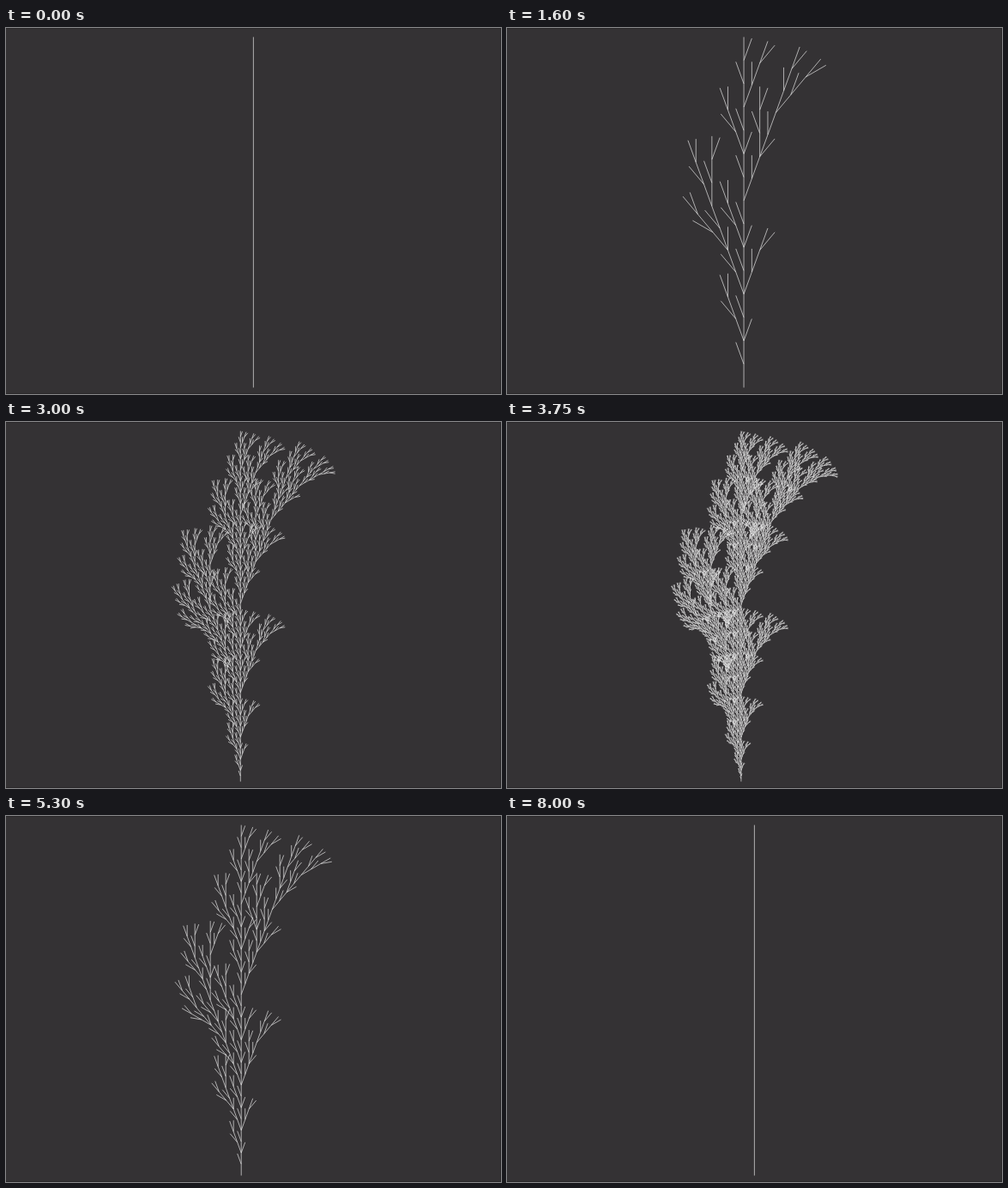
An HTML page with a canvas that plays this animation: 577 by 426 pixels, repeating every 8.7 s.

```html
<!DOCTYPE html>
<html>
<head>
<meta charset="utf-8">
<style>
  html, body { margin: 0; width: 100%; height: 100%; overflow: hidden; background: #343234; }
  canvas { display: block; }
</style>
</head>
<body>
<canvas width="577" height="426"></canvas>
<script>
const ctx = document.querySelector('canvas').getContext('2d');
const W = 577, H = 426, LOOP = 8700;
const TOP = 10.5, BASE = 418.5, MID = 288.4, ANGLE = Math.PI / 9;
// Times at which the next generation appears: 0 up to 6 and back to 0
const STARTS = [0, 150, 850, 1550, 2300, 3000, 3750, 4650, 5300, 6000, 6650, 7350, 8000];

// L-system F -> F[+F]F[-F][F]; returns the point where the turtle ends.
// Keys by position keep overlapping segments from being drawn twice.
function grow(n, p, a, out) {
  if (n === 0) {
    const q = [p[0] - Math.sin(a), p[1] + Math.cos(a)];
    out.set([...p, ...q].map(v => Math.round(v * 1000)).join(), [p, q]);
    return q;
  }
  p = grow(n - 1, p, a, out);
  grow(n - 1, p, a + ANGLE, out);
  p = grow(n - 1, p, a, out);
  grow(n - 1, p, a - ANGLE, out);
  grow(n - 1, p, a, out);
  return p;
}

function drawPlant(n) {
  ctx.fillStyle = '#2a282a';
  ctx.fillRect(0, 0, W, H);
  ctx.fillStyle = '#343234';
  ctx.fillRect(0, 1, W - 1, H - 2);

  const segments = new Map();
  grow(n, [0, 0], 0, segments);
  let left = 0, right = 0, height = 0;
  for (const [, [x, y]] of segments.values()) {
    left = Math.min(left, x);
    right = Math.max(right, x);
    height = Math.max(height, y);
  }
  const scale = (BASE - TOP) / height, centre = (left + right) / 2;
  const place = ([x, y]) => [MID + (x - centre) * scale, BASE - y * scale];

  ctx.beginPath();
  for (const [p, q] of segments.values()) {
    ctx.moveTo(...place(p));
    ctx.lineTo(...place(q));
  }
  ctx.strokeStyle = '#e6e6e6';
  ctx.lineWidth = 0.7;
  ctx.stroke();
}

let shown = -1;
function frame() {
  const t = performance.now() % LOOP;
  const step = STARTS.filter(s => s <= t).length - 1;
  const level = 6 - Math.abs(6 - step);
  if (level !== shown) drawPlant(shown = level);
  requestAnimationFrame(frame);
}
frame();
</script>
</body>
</html>
```
